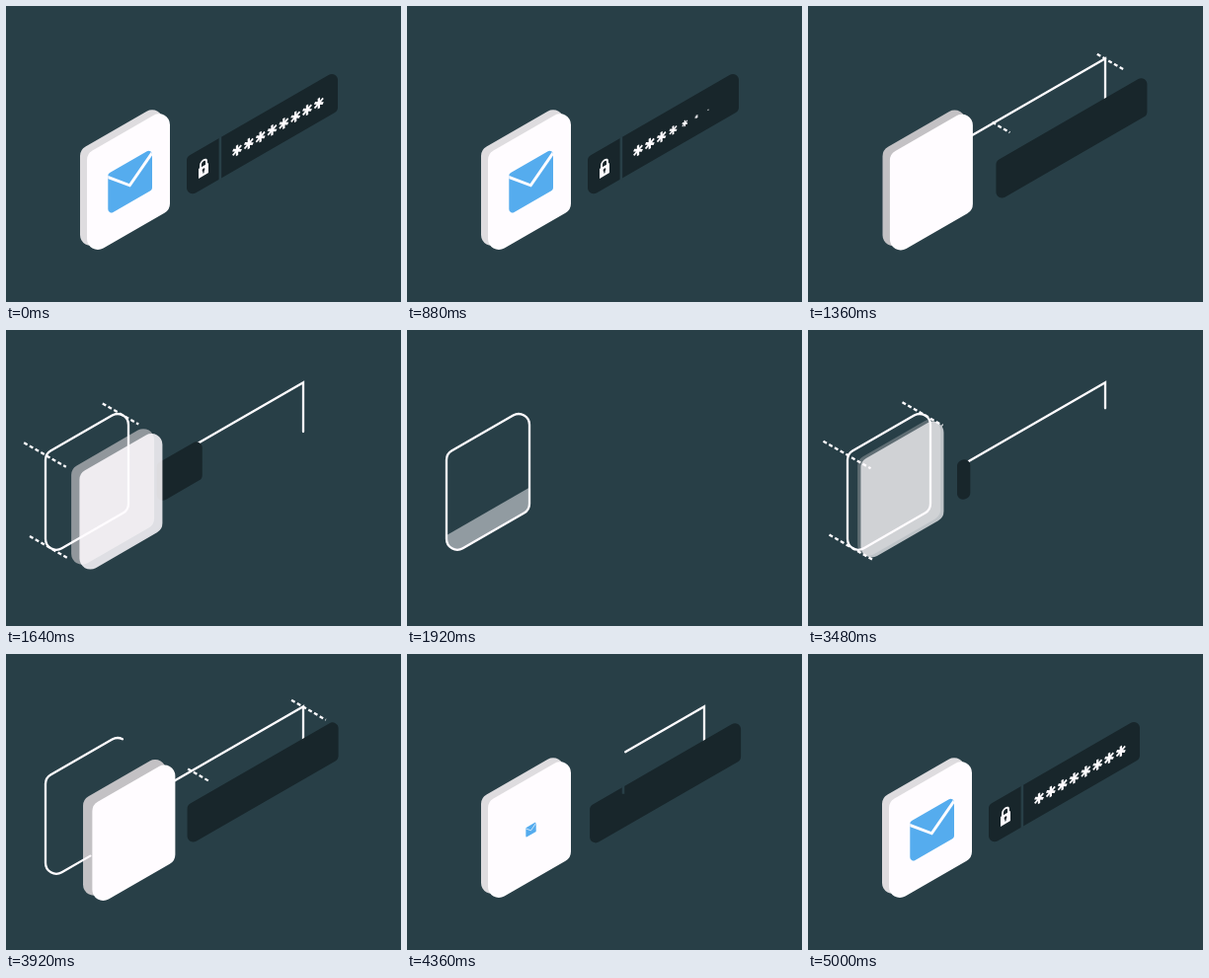
These frames come from a looping animation (400 px wide and 300 px high, 5120 ms). An HTML page with a canvas:

```html
<!DOCTYPE html>
<html lang="en">
<head>
<meta charset="utf-8">
<title>Mail login</title>
<style>
html, body { margin: 0; width: 100%; height: 100%; overflow: hidden; background: #283f47; }
canvas { display: block; }
</style>
</head>
<body>
<canvas id="stage" width="400" height="300"></canvas>
<script>
const ctx = document.getElementById('stage').getContext('2d');
const LOOP = 5120, STEP = 40, SLOPE = 0.577;
const BG = '#283f47', WHITE = '#fffcff', DARK = '#18262b', BLUE = '#55acee';
const TILE = { x: 40, y: 125.5, w: 84, h: 105.3, r: 11 };
const EDGE = 373; // length of the tile outline

const clamp = v => Math.min(1, Math.max(0, v));
const part = (s, a, b) => clamp((s - a) / (b - a));
const smooth = u => u * u * (3 - 2 * u);
const quart = u => u < 0.5 ? 8 * u ** 4 : 1 - 8 * (1 - u) ** 4;
const quad = u => u < 0.5 ? 2 * u * u : 1 - 2 * (1 - u) ** 2;

// Smooth interpolation through [time, value] pairs
function keys(s, ...list) {
  let v = list[0][1];
  for (let i = 1; i < list.length; i++) {
    const [a, from] = list[i - 1], [b, to] = list[i];
    if (s >= a) v = from + (to - from) * smooth(part(s, a, b));
  }
  return v;
}

// Rounded parallelogram whose top edge rises to the right
function panel(x, y, w, h, r) {
  const rise = w * SLOPE;
  r = Math.min(r, w / 2.05);
  ctx.beginPath();
  ctx.moveTo(x, y + r * SLOPE);
  ctx.arcTo(x, y + h, x + w, y + h - rise, r);
  ctx.arcTo(x + w, y + h - rise, x + w, y - rise, r);
  ctx.arcTo(x + w, y - rise, x, y, r);
  ctx.arcTo(x, y, x, y + h, r);
  ctx.closePath();
}

function tilePath(shift) {
  panel(TILE.x + shift, TILE.y + shift * SLOPE, TILE.w, TILE.h, TILE.r);
}

function line(...pts) {
  ctx.beginPath();
  pts.forEach(p => ctx.lineTo(...p));
}

// Strokes the current path between two distances along it
function trim(a, b) {
  if (b <= a) return;
  ctx.setLineDash([b - a, 9999]);
  ctx.lineDashOffset = -a;
  ctx.stroke();
  ctx.setLineDash([]);
  ctx.lineDashOffset = 0;
}

// Dashed guide along the slide direction, growing from its middle
function guide(x, y, half, size) {
  const d = half * size;
  if (d < 0.5) return;
  ctx.lineWidth = 2.3;
  ctx.lineCap = 'butt';
  ctx.setLineDash([4, 2.6]);
  line([x - d, y - d * SLOPE], [x + d, y + d * SLOPE]);
  ctx.stroke();
  ctx.setLineDash([]);
}

// Draws in the slanted plane around a point
function slanted(x, y, size, draw) {
  if (size <= 0) return;
  ctx.save();
  ctx.transform(size, -SLOPE * size, 0, size, x, y);
  draw();
  ctx.restore();
}

function connector(s) {
  const total = 215;
  ctx.strokeStyle = WHITE;
  ctx.lineWidth = 2.3;
  ctx.lineCap = 'round';
  line([158, 135.7], [301, 53.2], [301, 103]);
  trim(total * quad(part(s, 4220, 4560)), total * quad(part(s, 3220, 3560)));
}

function lock() {
  ctx.strokeStyle = ctx.fillStyle = WHITE;
  ctx.lineWidth = 1.9;
  ctx.lineCap = 'butt';
  ctx.beginPath();
  ctx.moveTo(-3, -2);
  ctx.arc(0, -5.8, 3, Math.PI, 0);
  ctx.lineTo(3, -2);
  ctx.stroke();
  ctx.fillRect(-5, -3, 10, 10);
  ctx.fillStyle = DARK;
  ctx.beginPath();
  ctx.arc(0, 1, 1.4, 0, 7);
  ctx.fill();
  ctx.fillRect(-0.6, 1, 1.2, 3.4);
}

function star() {
  ctx.strokeStyle = WHITE;
  ctx.lineWidth = 2.3;
  ctx.lineCap = 'butt';
  for (const a of [30, 90, 150].map(d => d * Math.PI / 180)) {
    const dx = 5 * Math.cos(a), dy = 5.3 * Math.sin(a);
    line([-dx, -dy], [dx, dy]);
    ctx.stroke();
  }
}

function bar(s) {
  const w = keys(s, [3400, 0], [3840, 153]);
  if (w < 1) return;
  const shift = keys(s, [3480, -32], [4140, 12], [4440, 0]);
  ctx.save();
  ctx.translate(shift, shift * SLOPE);
  ctx.fillStyle = DARK;
  panel(183, 152.9, w, 41.7, 6);
  ctx.fill();

  const cut = 44 * smooth(part(s, 4300, 4520));
  ctx.fillStyle = BG;
  ctx.fillRect(215.6, 132.5, 2.6, cut);

  slanted(200, 165, smooth(part(s, 4380, 4640)), lock);
  for (let i = 0; i < 8; i++) {
    const x = 234 + i * 11.83;
    const start = 4480 + i * 40;
    slanted(x, 146.3 - (x - 234) * SLOPE, smooth(part(s, start, start + 240)), star);
  }
  ctx.restore();
}

function mail(size) {
  if (size <= 0) return;
  ctx.save();
  ctx.translate(125.5, 178);
  ctx.scale(size, size);
  ctx.translate(-125.5, -178);
  panel(103.3, 170, 44.7, 42, 3.5);
  ctx.fillStyle = BLUE;
  ctx.fill();
  ctx.clip();
  ctx.strokeStyle = WHITE;
  ctx.lineWidth = 3;
  ctx.lineCap = 'butt';
  line([101, 172.6], [125.3, 181.8], [150, 146]);
  ctx.stroke();
  ctx.restore();
}

function tile(s) {
  const level = keys(s, [3040, 0], [3280, TILE.h]);
  if (level <= 0) return;
  const front = keys(s, [3380, 0], [3700, 58], [4060, 42]);
  const back = keys(s, [3380, 0], [3700, 44], [4060, 35]);
  const tone = keys(s, [4020, 195], [4200, 222]);

  ctx.globalAlpha = keys(s, [3320, 0], [3480, 0.36], [3640, 1]);
  ctx.fillStyle = `rgb(${tone},${tone - 2},${tone + 1})`;
  tilePath(back);
  ctx.fill();

  ctx.save();
  if (level < TILE.h) {
    panel(TILE.x - 2, TILE.y + TILE.h - level + 1.2, TILE.w + 4, level + 4, 0);
    ctx.clip();
  }
  ctx.globalAlpha = keys(s, [3000, 0.45], [3480, 0.7], [3640, 1]);
  ctx.fillStyle = WHITE;
  tilePath(front);
  ctx.fill();
  ctx.restore();
  ctx.globalAlpha = 1;
}

function outline(s) {
  ctx.strokeStyle = WHITE;
  ctx.lineWidth = 2.3;
  ctx.lineCap = 'round';
  tilePath(0);
  if (s < 3700) {
    const drawn = EDGE * quart(part(s, 2600, 3080));
    if (drawn >= EDGE - 0.5) ctx.stroke();
    else trim(0, drawn);
    return;
  }
  const from = 136, tail = from + EDGE * part(s, 3705, 4002) ** 3;
  trim(tail, EDGE);
  trim(Math.max(0, tail - EDGE), from);
}

function guides(s) {
  ctx.strokeStyle = WHITE;
  const left = smooth(part(s, 3230, 3450)) * (1 - part(s, 3490, 3700) ** 2);
  guide(39.5, 126.5, 24, left);
  guide(116, 85, 20.5, left);
  guide(44, 220.5, 22.5, left);
  const right = smooth(part(s, 3660, 3860)) * (1 - part(s, 3840, 4170) ** 2);
  guide(195.5, 123, 12, right);
  guide(306.5, 56.7, 18.5, right);
}

// Folds the loop onto the build-up: hold, fast rewind, pause, build
function buildTime(t) {
  if (t < 740) return 5000;
  if (t < 2240) return 5000 - (t - 740) * 1.6;
  return Math.min(5000, Math.max(2600, t));
}

function frame(now) {
  const s = buildTime(Math.floor((now % LOOP) / STEP) * STEP);
  ctx.fillStyle = BG;
  ctx.fillRect(0, 0, 400, 300);
  if (s > 2600) {
    connector(s);
    bar(s);
    tile(s);
    outline(s);
    guides(s);
    mail(smooth(part(s, 4260, 4580)));
  }
  requestAnimationFrame(frame);
}
requestAnimationFrame(frame);
</script>
</body>
</html>
```
